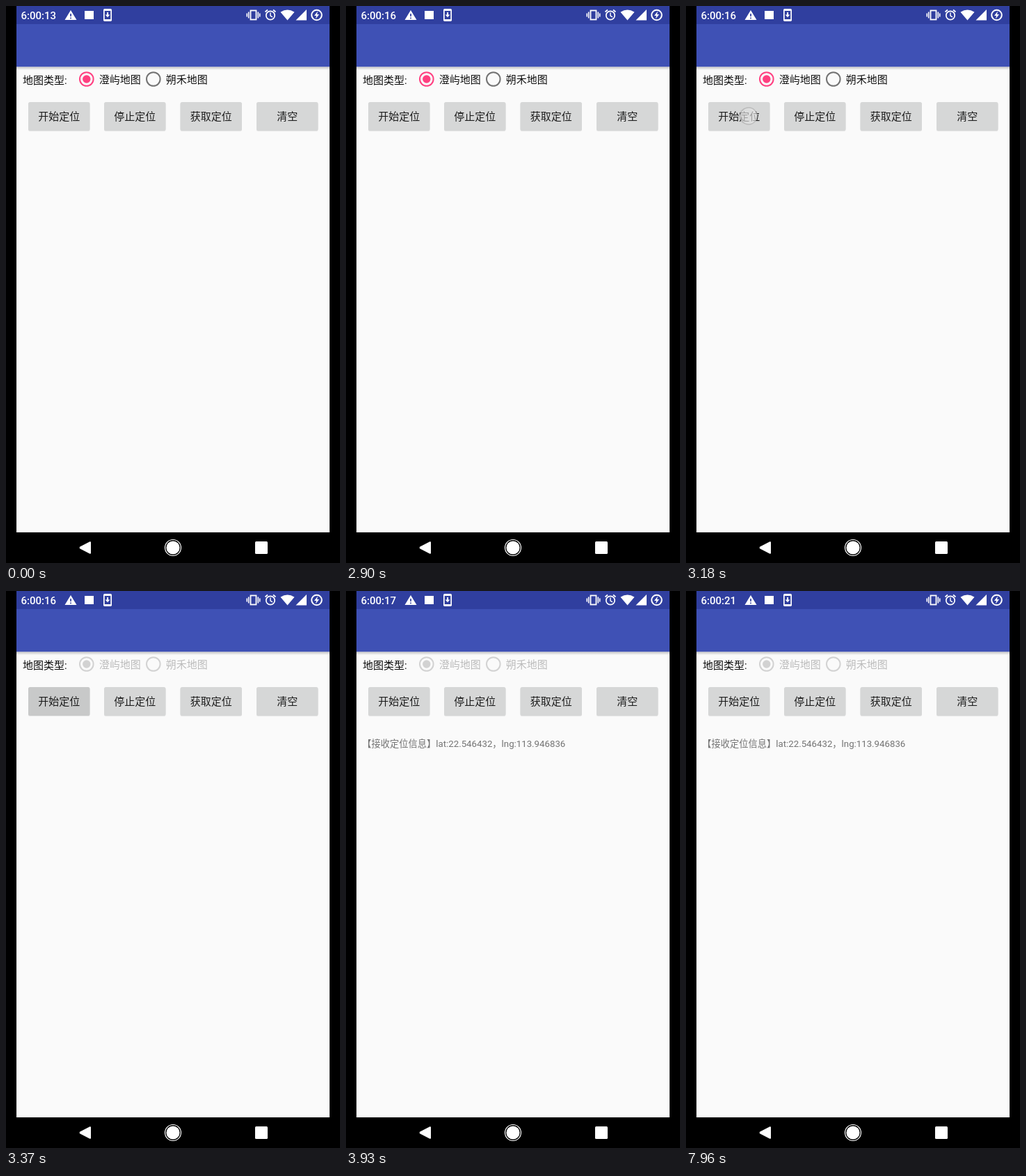
Write an HTML page with a canvas that moves like this. It is 480 by 800 pixels and loops after 8000 ms.

```html
<!DOCTYPE html>
<html lang="zh-CN">
<head>
<meta charset="utf-8">
<style>
html, body { margin: 0; width: 100%; height: 100%; overflow: hidden; background: #000; }
canvas { display: block; width: 480px; height: 800px; }
</style>
</head>
<body>
<canvas id="stage" width="480" height="800"></canvas>
<script>
const g = document.getElementById('stage').getContext('2d');
const FONT = 'Roboto, "Noto Sans CJK SC", "Noto Sans CJK", sans-serif';
const LOOP = 8000;
const BAR = '#303f9f', PAGE = '#fafafa', WHITE = '#fff';
const TICKS = [940, 1970, 2900, 3930, 4960, 5900, 6930, 7960];
const BUTTONS = [[32, '开始定位'], [141, '停止定位'], [250.5, '获取定位'], [360, '清空']];
const TAP = { down: 2980, press: 3130, up: 3360, end: 3650 };

function rect(x, y, w, h, color, r = 0) {
  g.fillStyle = color;
  g.beginPath();
  g.roundRect(x, y, w, h, r);
  g.fill();
}

function disc(x, y, r, color) {
  g.fillStyle = color;
  g.beginPath();
  g.arc(x, y, r, 0, Math.PI * 2);
  g.fill();
}

function ring(x, y, r, color, width) {
  g.strokeStyle = color;
  g.lineWidth = width;
  g.beginPath();
  g.arc(x, y, r, 0, Math.PI * 2);
  g.stroke();
}

function poly(points, color) {
  g.fillStyle = color;
  g.beginPath();
  for (const [x, y] of points) g.lineTo(x, y);
  g.closePath();
  g.fill();
}

function line(points, color, width) {
  g.strokeStyle = color;
  g.lineWidth = width;
  g.beginPath();
  for (const [x, y] of points) g.lineTo(x, y);
  g.stroke();
}

function text(str, x, y, size, color, align = 'left', weight = 400) {
  g.font = `${weight} ${size}px ${FONT}`;
  g.textAlign = align;
  g.fillStyle = color;
  g.fillText(str, x, y);
}

function statusBar(t) {
  rect(15, 0, 450, 26, BAR);
  const sec = 13 + TICKS.filter(s => t >= s).length;
  text('6:00:' + sec, 21.5, 18.5, 15, WHITE, 'left', 500);

  // warning
  poly([[93, 6], [101.5, 20], [84.5, 20]], WHITE);
  rect(92.2, 11, 1.7, 4, BAR);
  rect(92.2, 16.4, 1.7, 1.8, BAR);

  rect(113, 7, 13, 12, WHITE);

  // phone with download arrow
  rect(140, 4, 12, 18, WHITE, 1.8);
  rect(141.7, 7, 8.6, 12, BAR);
  rect(145, 9, 2, 4, WHITE);
  poly([[142.7, 12.5], [149.3, 12.5], [146, 16.3]], WHITE);

  // vibrate
  g.strokeStyle = WHITE;
  g.lineWidth = 1.8;
  g.strokeRect(351.5, 6.5, 8, 13);
  for (const s of [-1, 1]) {
    rect(355.5 + s * 6.8 - .8, 8.5, 1.6, 9, WHITE);
    rect(355.5 + s * 9.2 - .8, 10.5, 1.6, 5, WHITE);
  }

  // alarm
  ring(380, 13.5, 6.2, WHITE, 1.7);
  line([[380, 9.5], [380, 14], [383, 15.8]], WHITE, 1.4);
  line([[372.5, 8.5], [376, 5.5]], WHITE, 1.7);
  line([[384, 5.5], [387.5, 8.5]], WHITE, 1.7);

  // wifi
  g.fillStyle = WHITE;
  g.beginPath();
  g.moveTo(404.5, 20.5);
  g.lineTo(394.5, 8.7);
  g.quadraticCurveTo(404.5, 2.5, 414.5, 8.7);
  g.closePath();
  g.fill();

  poly([[432, 5], [432, 20.5], [416.5, 20.5]], WHITE);

  // charging
  ring(446.5, 13, 7.3, WHITE, 2);
  poly([[448, 7.5], [443, 14], [446, 14], [445, 18.5], [450, 12], [447, 12]], WHITE);
}

function radio(x, label, on, enabled) {
  const color = !enabled ? '#d2d2d2' : on ? '#ff4081' : '#737373';
  ring(x, 105, 9.8, color, 2);
  if (on) disc(x, 105, 5.7, color);
  text(label, x + 18, 110.6, 15, enabled ? '#111' : '#bcbcbc');
}

function button(x, label) {
  rect(x, 139, 88.5, 41, '#e4e4e4', 2.5);
  rect(x, 138, 88.5, 41, '#d6d7d7', 2.5);
  text(label, x + 44.25, 163.6, 15, '#1c1c1c', 'center');
}

function ripple(t) {
  const grow = Math.min(1, (t - TAP.press) / (TAP.up - TAP.press));
  const fade = Math.min(1, Math.max(0, (TAP.end - t) / (TAP.end - TAP.up)));
  if (grow <= 0 || fade <= 0) return;
  g.save();
  g.beginPath();
  g.roundRect(32, 138, 88.5, 41, 2.5);
  g.clip();
  disc(90 - 14 * grow, 158, 50 * grow, `rgba(0,0,0,${.07 * fade})`);
  g.restore();
}

function touch(t) {
  if (t < TAP.down || t >= TAP.up) return;
  disc(90, 158, 12, 'rgba(232,232,232,.65)');
  ring(90, 158, 12, 'rgba(165,165,165,.6)', 1.3);
}

function navBar() {
  rect(0, 756, 480, 44, '#000');
  g.lineJoin = 'round';
  const back = [[106, 778], [121, 770.2], [121, 785.8]];
  poly(back, WHITE);
  line([...back, back[0]], WHITE, 2);
  g.lineJoin = 'miter';
  disc(240, 778, 9.6, WHITE);
  ring(240, 778, 11.5, WHITE, 1.2);
  rect(358, 769, 18, 18, WHITE, 1.5);
}

function draw(t) {
  // the screen refreshes about every 94 ms during the tap
  if (t >= 2900 && t < TAP.end) t = 2900 + Math.floor((t - 2898) / 94) * 94;
  const enabled = t < TAP.up;

  rect(0, 0, 480, 800, '#000');
  rect(15, 26, 450, 730, PAGE);
  statusBar(t);
  rect(15, 26, 450, 61.5, '#3f51b5');
  const shade = g.createLinearGradient(0, 87.5, 0, 92);
  shade.addColorStop(0, '#c6c6c6');
  shade.addColorStop(1, PAGE);
  rect(15, 87.5, 450, 4.5, shade);

  text('地图类型:', 24, 112, 15, '#0c0c0c');
  radio(115.8, '澄屿地图', true, enabled);
  radio(211.8, '朔禾地图', false, enabled);

  for (const [x, label] of BUTTONS) button(x, label);
  ripple(t);
  touch(t);

  if (t >= 3930) {
    text('【接收定位信息】lat:22.546432，lng:113.946836', 23.3, 224, 13.25, '#737373');
  }
  navBar();
}

function frame(now) {
  draw(now % LOOP);
  requestAnimationFrame(frame);
}
draw(0);
requestAnimationFrame(frame);
</script>
</body>
</html>
```
